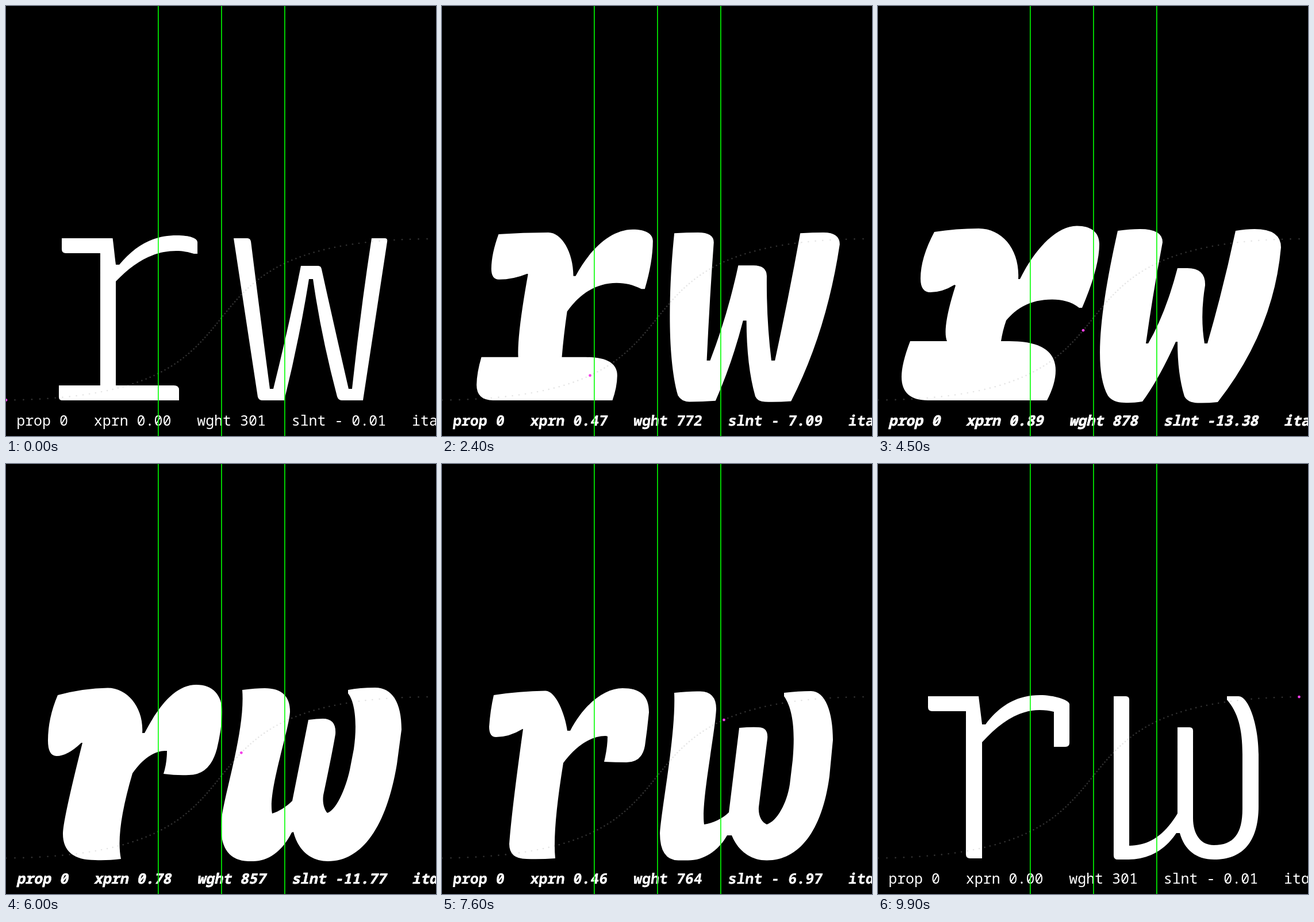
Write an HTML page that moves like this. It is 748 by 748 pixels and loops after 10000 ms.

```html
<!DOCTYPE html>
<html lang="en">
<head>
<meta charset="utf-8">
<title>Variable letters</title>
<style>
  html, body { margin: 0; height: 100%; overflow: hidden; background: #000; }
  svg { display: block; width: 100vw; height: 100vh; }
  .letter { fill: #fff; }
  .trail { fill: rgba(170, 170, 170, .3); }
  .marker { fill: #f43fe8; }
  .guide { stroke: #0f0; stroke-width: 1.6; }
  text {
    font: 24.93px "Noto Sans Mono", "DejaVu Sans Mono", monospace;
    fill: #fff; stroke: #fff; white-space: pre;
  }
</style>
</head>
<body>
<svg viewBox="0 0 748 748">
  <path id="r" class="letter"/>
  <path id="w" class="letter"/>
  <text id="axes" xml:space="preserve"/>
  <g id="trail" class="trail"/>
  <path class="guide" d="M264.9 0V748M374.9 0V748M484.9 0V748"/>
  <circle id="marker" class="marker" r="2.4"/>
</svg>
<script>
const STEP = 100, STEPS = 100, SIZE = 748;
const $ = id => document.getElementById(id);

// Weight climbs quickly to 800, then slowly to 900.
const weightAt = p => p < .5 ? 300 + 1000 * p : 700 + 200 * p;
const progress = p => (p + (weightAt(p) - 300) / 600) / 2;

const pose = (p, r, w) => ({ at: progress(p), r, w });

const upright = [
  pose(0,
    `M97 404Q141 404 185.5 404C187 414 189 435 191 450L197 450C227 414 258 399 297 399
     C320 399 333 404 333 411Q333 421 333 431L327 431C317 428 308 426 296 426
     C256 426 222 446 191 479Q191 570 191 660L292 660Q301 660 301 668Q301 677 301 686
     L98 686Q92 686 92 680Q92 670 92 660L164 660Q164 545 164 430L164 430
     Q134 430 104 430Q97 430 97 423Q97 414 97 404Z`,
    `M396 404Q408 404 420 404Q425 404 426 410Q442 538 459 666L465 666Q492 558 513 452
     L543 452Q548 452 549 458Q572 562 596 666L602 666Q616 535 636 404Q647 404 659 404
     Q664 404 663 410Q642 548 621 686Q602 686 584 686Q578 686 576 679Q548 573 534 475
     L527 475Q510 581 484 686Q464 686 446 686Q440 686 438 680C424 588 410 496 396 404Z`),
  pose(.1815,
    `M97 402Q144 401 190 401C196 401 205 436 208 459L214 459C244 416 276 395.5 312 395.5
     C334 395.5 347 401 347 411Q346 432 345 454L337 454C325 449 313 447 301 447
     C266 447 234 466 207 501Q203 572 200 642L275 642Q302 642 302 655Q301 670 300 686
     L91 686Q80 686 80 674Q81 658 82 642L151 642Q156 543 161 443L161 443
     Q132 446 104 446Q95 446 95 435Q96 418 97 402Z`,
    `M397 401Q416 401 434 401Q443 401 443 409Q450 530 457 650L465 650Q487 554 509 449
     L546 449Q559 449 560 459Q572 555 585 650L594 650Q612 530 631 401Q650 401 668 401
     Q677 401 677 411Q652 557 620 686Q592 687 566 687Q559 687 557 679Q537 598 536 497
     L528 497Q518 584 490 686Q463 687 436 687Q428 687 426 679C414 610 402 500 397 401Z`),
  pose(.684,
    `M99 395Q140 391 183 391C213 391 238 425 237 474L240 474C264 424 302 386 340 386
     C362 386 375 394 375 408Q375 452 356 508L351 508C336 500 322 496 305 496
     C270 496 242 514 222 544Q215 574 212 598L240 598Q306 598 306 638Q306 660 295 686
     L88 686Q52 686 52 653Q52 630 63 598L125 598Q120 585 145 476L143 475
     Q120 488 97 488Q82 488 82 466Q82 436 99 395Z`,
    `M407 393Q430 391 450 391Q485 391 485 412Q472 500 462 603L467 603Q501 531 518 452
     L540 452Q567 452 567 474Q561 542 568 603L573 603Q600 494 620 393Q643 391 662 391
     Q698 391 698 416Q676 570 602 688Q578 690 560 689Q545 689 540 679Q527 638 527 568
     L522 568Q499 637 470 687Q449 689 428 689Q412 689 404 677C382 610 391 490 407 393Z`),
  pose(.892,
    `M98 393Q136 387 175 387C217 387 247 425 244 475L247 475C270 428 308 382.5 346 382.5
     C371 382.5 385 394 385 414Q385 455 355 525L350 525C336 514 320 510.5 303 510.5
     C266 510.5 241 525 223 547Q217 564 214 583L228 583Q309 583 309 634Q309 657 294 686
     L87 686Q41 686 41 645Q41 622 56 583L120 583Q111 561 135 486L133 485
     Q112 498 91 498Q74 498 74 474Q74 438 98 393Z`,
    `M417 391Q438 388 456 388Q495 388 495 411Q479 495 466 587L470 587Q500 536 521 456
     L538 456Q570 456 569 486Q560 540 568 587L573 587Q601 490 622 391Q640 388 655 388
     Q701 388 701 420Q688 565 591 689Q573 691 556 690.5Q539 690 533 679Q521 640 521 584
     L518 584Q488 650 460 688Q441 691 428 690Q409 690 400 678C374 632 387 525 417 391Z`)
];

const cursive = [
  pose(0,
    `M87 404Q131 404 175 404C177 420 179 437 181 453L187 453C215 415 248 402 282 402
     C305 402 333 410 333 418Q333 452 333 485Q333 492 326 492Q316 492 306 492
     Q306 461 306 431Q295 428 281 428C245 428 213 449 181 484Q181 585 181 686
     Q170 686 160 686Q153 686 153 679Q153 554 153 430L153 430Q123 430 94 430
     Q87 430 87 423Q87 413 87 404Z`,
    `M410 404Q421 404 431 404Q437 404 437 410C437 495 437 579 437 664
     C470 664 497 648 521 608L521 458Q532 458 542 458Q548 458 548 464Q548 540 548 616
     C548 645 562 663 584 663C619 663 634 643 634 600L634 505C634 460 626 432 607 410
     L607 404Q617 404 627 404C645 404 662 455 662 505L662 595C662 660 632 688 585 688
     C553 688 533 671 525 642L519 642C497 675 467 688 436 688Q426 688 417 688
     Q410 688 410 681C410 589 410 496 410 404Z`),
  pose(.4644,
    `M90 402Q135 395 180 394.5C198 395 214 435 218 464L223 464C249 415 284 390 314 390
     C344 390 360 402 360 432Q357 462 353 490Q348 519 321 519Q302 519 282 518
     Q288 493 288 474Q287 473 284 473C260 473 234 489 211 520Q192 637 197 686
     Q170 688 147 687Q117 687 117 661Q121 605 141 461L140 461Q117 475 94 475
     Q82 475 82 457Q84 428 90 402Z`,
    `M404 398Q430 395 449 395.5Q477 396 477 426C475 470 450 590 456 627
     C470 625 488 617 499 606L517 459Q535 457.5 550 458Q568 458 566 478Q558 540 551 597
     C550 612 556 623 565 627C583 621 600 590 605 557L610 515C614 470 612 428 595 404
     L595 398Q620 395 642 395C667 395 680 432 680 480L674 543C661 640 620 689.5 565 689.5
     C537 689.5 515 673 504 646L496 646C480 674 455 689.5 428 689.5Q420 689.5 411 689.5
     Q379 689 379 642C383 590 407 470 404 398Z`),
  pose(.784,
    `M90 402Q135 390 177 389.5C212 389.5 240 425 237 468L241 468C267 418 296 384 331 384
     C360 384 376 402 376 432Q375 462 367 495Q355 541 318 541Q298 542 274 539
     Q280 520 280 499Q278 499 276 499C255 500 237 514 220 538Q190 640 200 687
     Q175 690 155 689Q99 689 99 643Q99 620 133 485L131 485Q107 508 88 508
     Q73 508 73 481Q73 442 90 402Z`,
    `M411 393Q434 390 450 390Q494 390 494 431C492 465 455 570 463 608
     C474 605 488 596 498 586L526 445Q541 443 551 443Q575 443 573 470Q568 500 552 576
     C550 590 554 602 559 607C577 601 594 555 599 527L605 496C611 455 608 415 595 399
     L595 393Q615 389 642 389C672 389 688 415 688 462L680 522C662 630 620 691 560 691
     C530 691 508 672 500 640L497 641C480 675 455 691 430 691Q425 691 421 691
     Q374 689 374 632C373 590 417 470 411 393Z`)
];

const NUMBER = /[\d.]+/g;

function blend(poses, letter, at) {
  let k = 0;
  while (k < poses.length - 2 && at > poses[k + 1].at) k++;
  const a = poses[k], b = poses[k + 1];
  const mix = (at - a.at) / (b.at - a.at);
  const ends = b[letter].match(NUMBER);
  let n = 0;
  return a[letter].replace(NUMBER, v => (+v + (ends[n++] - v) * mix).toFixed(2));
}

const bezier = (t, a, b, c, d) => {
  const u = 1 - t;
  return u * u * u * a + 3 * u * u * t * b + 3 * u * t * t * c + t * t * t * d;
};

function place(dot, t) {
  dot.setAttribute('cx', bezier(t, 0, .7 * SIZE, .3 * SIZE, SIZE));
  dot.setAttribute('cy', bezier(t, 685.5, 680.5, 405, 405));
}

// Eased out and back, bending at a quarter of the time.
function expression(t) {
  const eased = t * t * (3 - 2 * t) + .07 * t * (1 - t) ** 7;
  const s = Math.min(eased, 1 - eased), bend = .15625;
  const p = s < bend ? s / bend / 2 : .5 + (s - bend) / (.5 - bend) / 2;
  return Math.max(p, .0007);
}

for (let i = 0; i < STEPS; i++) {
  const dot = document.createElementNS('http://www.w3.org/2000/svg', 'circle');
  dot.setAttribute('r', 1.3);
  place(dot, i / STEPS);
  $('trail').append(dot);
}

function draw(step) {
  const t = step / STEPS, p = expression(t), italic = t >= .5;
  const weight = Math.round(weightAt(p)), slant = 15 * p;
  const poses = italic ? cursive : upright;
  for (const id of ['r', 'w']) $(id).setAttribute('d', blend(poses, id, progress(p)));

  const axes = $('axes');
  axes.textContent = [
    'prop 0', 'xprn ' + p.toFixed(2), 'wght ' + weight,
    'slnt -' + slant.toFixed(2).padStart(5), italic ? 'it\u0251l 1' : 'ital 0'
  ].join('   ');
  axes.style.fontWeight = weight;
  axes.style.strokeWidth = Math.max(0, (weight - 700) / 250);
  axes.setAttribute('transform', `translate(18.2 729.5) skewX(${-slant})`);
  place($('marker'), t);
}

let shown = -1;
function tick(now) {
  const step = Math.floor(now / STEP) % STEPS;
  if (step !== shown) draw(shown = step);
  requestAnimationFrame(tick);
}
draw(0);
requestAnimationFrame(tick);
</script>
</body>
</html>
```
